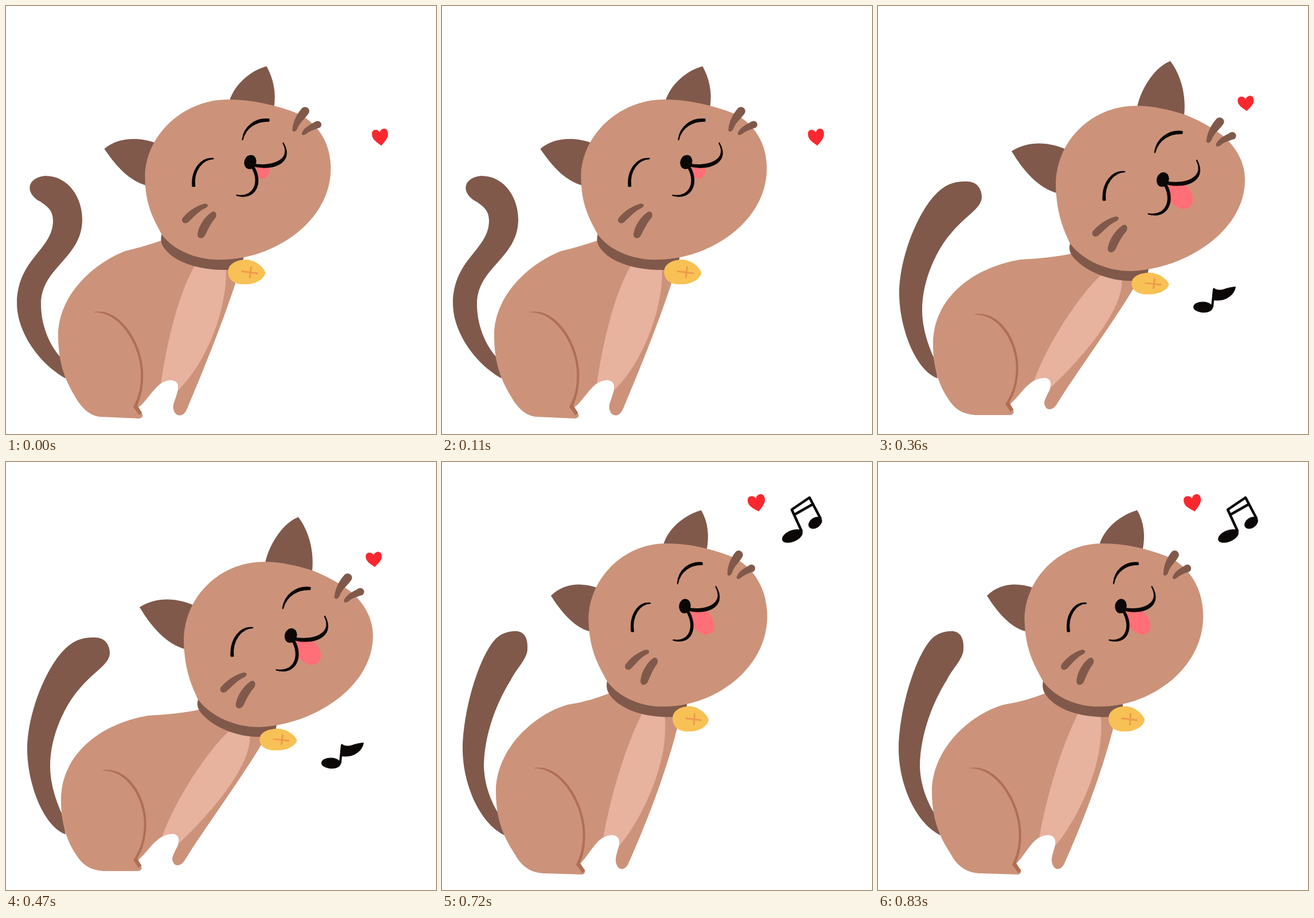
Write an HTML page with a canvas that moves like this. It is 750 px wide and 746 px high and loops after 900 ms.

```html
<!DOCTYPE html>
<html lang="en">
<head>
<meta charset="utf-8">
<title>Happy cat</title>
<style>
  html, body { margin: 0; width: 100%; height: 100%; overflow: hidden; background: #fff; }
  canvas { display: block; }
</style>
</head>
<body>
<canvas id="stage" width="750" height="746"></canvas>
<script>
const ctx = document.getElementById('stage').getContext('2d');
const STEP = 180;
const C = {
  fur: '#cc937a', dark: '#80594b', chest: '#e7b29e', line: '#b06f55', ink: '#0a0706',
  tongue: '#ff6f77', gold: '#f8c155', cross: '#f09a4e', heart: '#f9282f'
};

const THIGH = 'M159 531C205 524 241 585 241 634C241 665 234 680 229 691L237 704L232 708L222 694C232 676 237 660 237 634C237 590 205 531 159 532Z';
const WHISKERS_RIGHT = 'M529 200C530 185 538 172 545 164C551 157 561 164 558 171C553 180 543 186 538 198C535 206 528 205 529 200ZM546 205C551 195 562 191 570 186C578 183 583 192 577 197C568 200 560 202 553 208C547 212 544 209 546 205Z';
const WHISKERS_LEFT = 'M338 354C346 344 360 334 374 330C382 328 384 334 378 337C366 342 358 352 348 361C341 368 333 360 338 354ZM364 380C367 366 376 353 387 345C393 340 399 346 395 354C387 363 382 374 377 384C372 394 361 390 364 380Z';
const EYES = 'M355 299C353 270 370 249 391 251C372.5 251.5 355.5 271 358.5 299ZM442 218C445 194 466 180 488 182.5L488 185.5C467 185 447.5 195.5 442 218Z';
const MOUTH = 'M458 263C490 273 533.5 260 513 224C530 256 489 267 458 260ZM461 264C478 291 466 324 432 315C464 320 474 289 457 264Z';
const TONGUE = 'M464 262L494 265C504 274 510 285 507 296C503 308 488 308 480 302C474 298 470 295 468 290Z';
const TONGUE_TIP = 'M466 263L489 266C490 278 485 286 477 286C471 286 469 284 468 280Z';
const BELL = 'M417 447C418 432 436 427 449 427C465 428 479 440 482 450C480 462 462 471 446 470C428 471 416 462 417 447Z';
const HEART = 'M0-.3C.1-.55 .54-.6 .54-.2C.54 .12 .18 .33 0 .5C-.18 .33-.54 .12-.54-.2C-.54-.6-.1-.55 0-.3Z';

const HEAD_PARTS = {
  ears: 'M419 151C428 122 455 98 484 90C496 112 501 135 497 162ZM201 234C225 213 262 213 292 224L275 298C245 290 222 265 201 234Z',
  collar: 'M301 383C297 398 304 408 318 420C345 440 385 446 420 445L443 432L444 420Z',
  skull: 'M418 148C340 147 272 210 272 283C272 330 286 355 301 383C322 412 365 429 408 427C495 426 596 362 596 268C596 225 575 191 540 173C502 158 460 148 418 148Z'
};

const tall = {
  body: 'M310 400C280 413 250 420 222 425C160 442 92 500 92 575C92 620 104 655 122 684C134 704 150 713 175 713L230 713C238 712 238 706 234 702L230 694C247 682 262 645 287 645C299 645 301 655 297 668C293 680 288 690 291 696C294 706 305 705 312 694C335 650 390 550 421 460L418 430Z',
  chest: 'M364 437C330 480 290 570 271 652L300 660C350 605 408 510 398 444Z',
  thigh: [0, 0, 0, 0],
  head: [1, 0, 0, 1, 0, 0]
};

// thigh: offset at its top, then at the foot. head: affine matrix. heart: x, y, width, height, turn.
// parts: head shapes that bend too far for the matrix, in stage coordinates.
const POSES = [
  {
    tail: 'M104 649C60 625 19 570 19 518C20 440 82 425 82 374C82 355 70 348 60 341C34 328 34 300 68 296C110 296 133 335 133 372C133 440 61 455 61 520C61 555 75 590 95 612Z',
    body: 'M285 404C250 416 230 422 208 427C150 450 91 505 91 575C91 625 105 655 120 680C132 702 148 715 165 716L232 719C239 718 240 713 236 709L231 699C247 690 262 652 287 652C298 652 302 659 300 669C296 685 290 695 292 702C294 716 308 718 315 704C340 645 375 560 400 484L400 440Z',
    chest: 'M332 448C300 500 280 590 270 658L301 669C350 620 386 530 384 455Z',
    thigh: [-5, 2, 0, 5],
    head: [1, 0, 0, 1, -29.5, 15],
    tongue: TONGUE_TIP,
    heart: [653, 229, 26, 29, -.12]
  },
  {
    ...tall,
    tail: 'M104 649C70 635 37 575 36 525C36 455 77 415 76 380C76 355 66 340 67 310C69 295 78 292 87 293C110 297 130 340 130 380C128 440 74 460 73 530C73 565 85 590 95 615Z',
    heart: [648, 197, 30, 28, -.15],
    notes: () => {
      noteHead(332, 118, 14, 7.5, -.2);
      noteHead(366, 106, 11, 7, -.2);
      stroke('M344 116L334 82L366 73L374 104M338 94L369 85', C.ink, 5);
    }
  },
  {
    tail: 'M104 649C65 635 37 560 37 500C38 430 77 340 115 316C125 309 140 305 157 306C174 307 181 320 181 333C181 352 155 364 130 393C105 420 77 475 77 530C77 560 87 590 97 612Z',
    body: 'M345 430C310 438 280 440 248 442C165 456 96 509 96 590C96 630 106 660 122 684C134 704 150 713 175 713L230 713C238 712 238 706 234 702L230 694C247 682 262 648 290 648C301 648 304 658 299 670C293 682 288 690 291 696C294 706 305 705 312 694C345 640 405 560 447 490L445 460Z',
    chest: 'M388 470C345 510 290 600 272 654L301 665C350 620 430 530 425 476Z',
    thigh: [10, 6, 0, 0],
    head: [1.0185, .01, -.02, 1.036, 38.2, 16.7],
    parts: {
      ears: 'M452 176C460 140 485 105 510 96C528 120 538 155 534 191ZM233 253C262 235 298 236 330 251L312 326C282 318 255 290 233 253Z',
      collar: 'M335 414C331 428 338 437 352 449C378 470 415 480 444 479L470 470L472 458Z',
      skull: 'M450 174C373 174 310 235 310 312C311 358 322 388 335 414C357 444 402 463 443 462C535 458 640 393 640 303C640 270 622 243 600 225C580 210 556 197 534 189C505 180 478 174 450 174Z'
    },
    bell: [1, 0, 0, .88, 25.5, 89],
    eyeShift: [-1, 8],
    mouthShift: [0, 14.5],
    cheekShift: [0, 5],
    heart: [642, 170, 26, 26, -.1],
    notes: () => {
      noteHead(567, 525, 17, 9.5, .05);
      stroke('M583 524L586 494', C.ink, 4);
      fill('M585 491C598 500 605 490 624 489C622 505 605 516 585 513Z', C.ink);
    }
  },
  {
    ...tall,
    tail: 'M104 648C80 640 41 580 41 512C42 440 95 340 165 328C180 323 195 321 203 321C222 323 228 340 227 352C224 370 210 376 190 379C140 392 125 420 100 449C80 480 76 510 76 545C78 575 90 595 97 615Z',
    heart: [552, 113, 22, 30, .06],
    notes: () => {
      noteHead(261, 131, 17, 10, -.2);
      stroke('M276 128L267 98', C.ink, 4);
      fill('M264 91C275 85 285 82 292 71C297 85 290 100 266 108Z', C.ink);
    }
  },
  {
    tail: 'M110 651C65 630 36 560 36 500C37 430 65 340 92 310C103 297 122 294 132 295C147 298 150 312 149 328C147 345 130 360 120 380C98 415 74 470 73 530C74 565 87 595 100 615Z',
    body: 'M305 398C270 412 250 418 219 423C160 440 94 500 94 575C94 630 112 660 128 685C140 708 160 717 180 717L245 719C251 717 250 711 247 709L241 700C258 685 270 650 297 650C309 651 311 660 309 668C305 682 301 692 304 700C307 712 319 713 325 700C352 640 388 550 410 465L405 430Z',
    chest: 'M350 436C318 500 295 580 281 655L310 668C350 620 398 520 388 440Z',
    thigh: [2, 2, 12, 8],
    head: [.963, -.008, .0424, 1.018, -18.2, -5.3],
    parts: {
      ears: 'M386 145C394 115 424 92 452 84C464 104 467 130 461 156ZM190 233C213 210 245 210 270 219L257 295C230 288 207 260 190 233Z'
    },
    eyeShift: [-6, -1],
    mouthShift: [-8, -1.5],
    cheekShift: [-2, 0],
    heart: [549.5, 72, 28, 29, -.22],
    notes: () => {
      noteHead(611, 129, 19, 10, -.4);
      noteHead(651, 106, 13, 9, -.6);
      stroke('M627 120L610 83L641 62L660 98M616 91L646 74', C.ink, 4.5);
    }
  }
];

function fill(path, color) {
  ctx.fillStyle = color;
  ctx.fill(new Path2D(path));
}

function stroke(path, color, width) {
  ctx.strokeStyle = color;
  ctx.lineWidth = width;
  ctx.lineCap = ctx.lineJoin = 'round';
  ctx.stroke(new Path2D(path));
}

// A tapered brush line with softened ends.
function brush(path) {
  fill(path, C.ink);
  stroke(path, C.ink, 2.3);
}

function noteHead(x, y, rx, ry, turn) {
  ctx.fillStyle = C.ink;
  ctx.beginPath();
  ctx.ellipse(x, y, rx, ry, turn, 0, Math.PI * 2);
  ctx.fill();
}

function within(matrix, paint) {
  ctx.save();
  ctx.transform(...matrix);
  paint();
  ctx.restore();
}

const shifted = ([x, y] = [0, 0], paint) => within([1, 0, 0, 1, x, y], paint);

function shear([topX, topY, footX, footY]) {
  const top = 531, span = 163;
  const kx = (footX - topX) / span, ky = (footY - topY) / span;
  return [1, 0, kx, 1 + ky, topX - kx * top, topY - ky * top];
}

function drawBody(pose) {
  fill(pose.tail, C.dark);
  fill(pose.body, C.fur);
  ctx.save();
  ctx.clip(new Path2D(pose.body));
  fill(pose.chest, C.chest);
  ctx.restore();
  within(shear(pose.thigh), () => fill(THIGH, C.line));
}

function drawHeadPart(pose, name, color) {
  const bent = pose.parts && pose.parts[name];
  if (bent) fill(bent, color);
  else within(pose.head, () => fill(HEAD_PARTS[name], color));
}

function drawHead(pose) {
  drawHeadPart(pose, 'ears', C.dark);
  drawHeadPart(pose, 'collar', C.dark);
  drawHeadPart(pose, 'skull', C.fur);
  within(pose.head, () => {
    shifted(pose.cheekShift, () => {
      fill(WHISKERS_RIGHT, C.dark);
      fill(WHISKERS_LEFT, C.dark);
    });
    shifted(pose.eyeShift, () => brush(EYES));
    shifted(pose.mouthShift, () => {
      fill(pose.tongue || TONGUE, C.tongue);
      brush(MOUTH);
      noteHead(455.5, 257, 10.5, 12.5, .3);
    });
  });
  within(pose.bell || pose.head, () => {
    fill(BELL, C.gold);
    stroke('M441 447.5L468 451M457 440L455 458', C.cross, 3);
  });
}

function drawHeart([x, y, w, h, turn]) {
  ctx.save();
  ctx.translate(x, y);
  ctx.rotate(turn);
  ctx.scale(w, h);
  fill(HEART, C.heart);
  ctx.restore();
}

function draw(now) {
  const pose = POSES[Math.floor(now / STEP) % POSES.length];
  ctx.fillStyle = '#fff';
  ctx.fillRect(0, 0, 750, 746);
  drawBody(pose);
  drawHead(pose);
  drawHeart(pose.heart);
  if (pose.notes) pose.notes();
}

function tick(now) {
  draw(now);
  requestAnimationFrame(tick);
}
draw(0);
requestAnimationFrame(tick);
</script>
</body>
</html>
```
